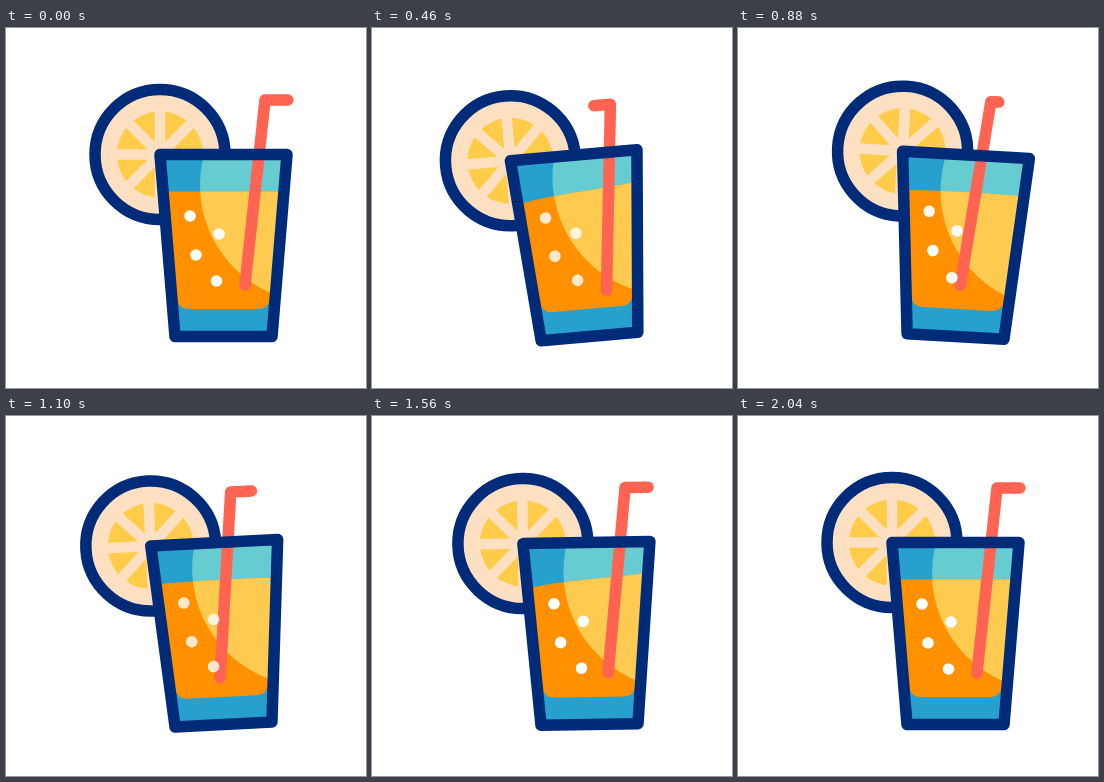
Animation, 360 px wide and 360 px high, one loop 2220 ms. Source, as an HTML page:

```html
<!DOCTYPE html>
<html lang="en">
<head>
<meta charset="utf-8">
<title>Drink</title>
<style>
html, body { margin: 0; width: 100%; height: 100%; overflow: hidden; background: #fff; }
svg { display: block; width: 100%; height: 100%; }
.line { fill: none; stroke-width: 11.5; stroke-linecap: round; stroke-linejoin: round; }
.navy { stroke: #002b79; }
</style>
</head>
<body>
<svg viewBox="0 0 360 360">
  <defs>
    <path id="glass" d="M154 126.5H281L266 308.5H169Z"/>
    <circle id="shine" cx="312" cy="157" r="118"/>
    <clipPath id="inside"><use href="#glass"/></clipPath>
    <clipPath id="wet"><path id="wetShape"/></clipPath>
  </defs>
  <g id="drink">
    <g transform="translate(154 126.5)">
      <circle r="65" class="line navy" style="fill: #fde0c1"/>
      <circle r="43" fill="#ffcc4a"/>
      <path d="M-44 0H44M0-44V44M-31-31L31 31M31-31L-31 31" stroke="#fde0c1" stroke-width="10.5"/>
    </g>
    <g clip-path="url(#inside)">
      <use href="#glass" fill="#27a0cd"/>
      <use href="#shine" fill="#66ccd2"/>
      <path id="liquid" fill="#ff9100"/>
      <g clip-path="url(#wet)"><use href="#shine" fill="#ffca50"/></g>
    </g>
    <path id="straw" class="line" stroke="#ff6352"/>
    <use href="#glass" class="line navy"/>
    <g id="bubbles" fill="#fff">
      <circle cx="184" cy="188" r="5.8"/>
      <circle cx="213" cy="206" r="5.8"/>
      <circle cx="190" cy="227" r="5.8"/>
      <circle cx="210.5" cy="253" r="5.8"/>
    </g>
  </g>
</svg>
<script>
const LOOP = 2220, LEVEL = 163.5;
const set = (id, name, value) => document.getElementById(id).setAttribute(name, value);
const smooth = p => (1 - Math.cos(Math.PI * p)) / 2;

// Progress from 0 to 1 between two times, held outside them.
const progress = (t, from, to) => Math.min(1, Math.max(0, (t - from) / (to - from)));
const ramp = (t, from, to) => smooth(progress(t, from, to));
// Smooth rise to 1 at the peak time and back to 0.
const bump = (t, from, peak, to) => ramp(t, from, peak) - ramp(t, peak, to);

// Rocking: each swing is one degree smaller and takes less time.
function tilt(t) {
  let from = 0, angle = 0, step = 450;
  for (let size = 5; size >= 0; size--) {
    const next = size % 2 ? -size : size;
    if (t < from + step) return angle + (next - angle) * smooth((t - from) / step);
    from += step;
    angle = next;
    step *= .82;
  }
  return 0;
}

function draw(t) {
  set('drink', 'transform', `rotate(${tilt(t)} 217.5 308.5)`);

  const slosh = .9 * bump(t, 0, 460, 860) - .35 * bump(t, 760, 990, 1240) + bump(t, 1100, 1540, 2000);
  const left = LEVEL + 9 * Math.abs(slosh), right = LEVEL - 6 * slosh;
  const d = `M157 ${left}C184 ${LEVEL} 242 ${LEVEL} 278 ${right}L264.5 269Q263 281 252 281H183Q172 281 170.5 269Z`;
  set('liquid', 'd', d);
  set('wetShape', 'd', d);

  const x = 239 - 23 * bump(t, 400, 1040, 1680);
  const y = 257 + 7 * (bump(t, 0, 440, 880) + bump(t, 880, 1240, 1600));
  const tip = 23 - 45 * (progress(t, 0, 370) - progress(t, 370, 1140));
  set('straw', 'd', `M${x} ${y}l20-185h${tip}`);

  const blink = smooth(2 * progress(t, 140, 1420) * 2);
  set('bubbles', 'transform', `translate(0 ${-3 * bump(t, 0, 950, 1900)})`);
  set('bubbles', 'opacity', 1 - .2 * blink);
}

const start = performance.now();
function tick() {
  draw((performance.now() - start) % LOOP);
  requestAnimationFrame(tick);
}
tick();
</script>
</body>
</html>
```
